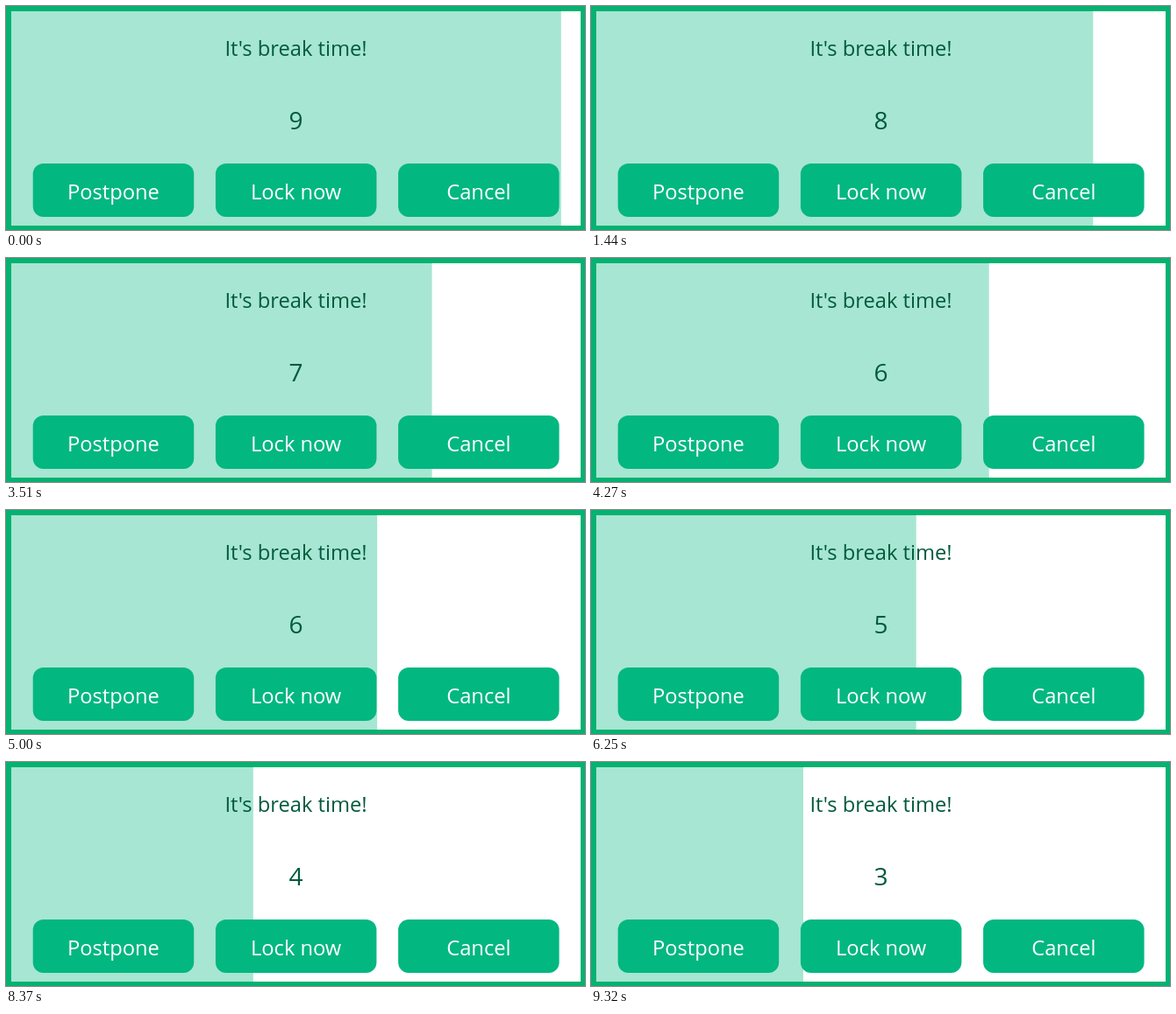
An HTML page for the animation above (9350 ms loop, 660 px wide and 256 px high).

```html
<!DOCTYPE html>
<html lang="en">
<head>
<meta charset="utf-8">
<title>Break timer</title>
<style>
  html, body { margin: 0; width: 100%; height: 100%; overflow: hidden; background: #fff; }
  svg { display: block; width: 100vw; height: 100vh; }
  text { font: 23.7px "Open Sans", "Noto Sans", sans-serif; text-anchor: middle; fill: #005a3c; }
  #count { font-size: 28px; }
  .button rect { fill: #03b780; }
  .button text { fill: #fff; }
</style>
</head>
<body>
<svg viewBox="0 0 660 256">
  <rect width="660" height="256" fill="#06b271"/>
  <rect x="6" y="6" width="649" height="245" fill="#fff"/>
  <rect id="bar" x="6" y="6" height="245" fill="#a7e6d2"/>
  <text x="330.5" y="57">It's break time!</text>
  <text id="count" x="330.5" y="141">9</text>
  <g id="buttons"></g>
</svg>
<script>
  const LOOP = 9350;
  const FULL = 649;
  const START = 626.8;
  const SPEED = 0.04193; // px per ms
  const bar = document.getElementById("bar");
  const count = document.getElementById("count");

  function addButton(label, x) {
    document.getElementById("buttons").innerHTML +=
      `<g class="button" transform="translate(${x} 180)">
        <rect width="183.5" height="61" rx="12"/>
        <text x="91.75" y="40.5">${label}</text>
      </g>`;
  }

  function render(t) {
    const width = START - SPEED * t;
    bar.setAttribute("width", width);
    count.textContent = Math.floor(width / FULL * 10);
  }

  ["Postpone", "Lock now", "Cancel"].forEach((label, i) => addButton(label, 30.7 + i * 208.2));

  const begin = performance.now();
  function tick() {
    render((performance.now() - begin) % LOOP);
    requestAnimationFrame(tick);
  }
  tick();
</script>
</body>
</html>
```
